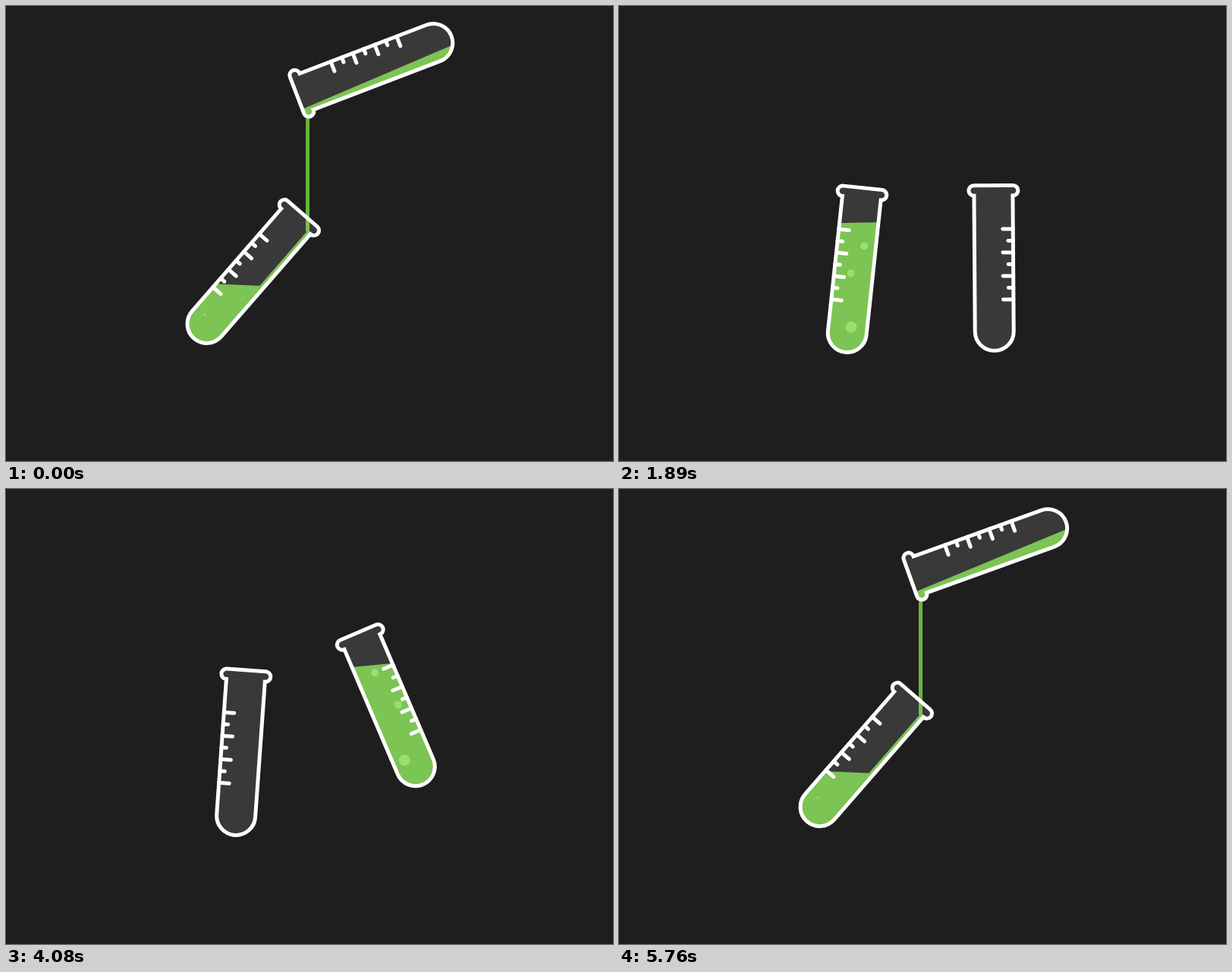
An HTML page with a canvas that plays this animation: 800x600 px, repeating every 5790 ms.

```html
<!DOCTYPE html>
<html lang="en">
<head>
<meta charset="utf-8">
<title>Test tubes</title>
<style>
  html, body { margin: 0; width: 100%; height: 100%; overflow: hidden; background: #1e1e1e; }
  canvas { display: block; }
</style>
</head>
<body>
<canvas id="stage" width="800" height="600"></canvas>
<script>
const ctx = document.getElementById('stage').getContext('2d');
const LOOP = 5790, RAD = Math.PI / 180;
const BACK = '#1e1e1e', GREEN = '#7cc454', BUBBLE = '#98de70', STREAM = '#69b53a';
const CENTER = 400.75, REACH = 92.75, MID = 337;   // tube rest positions
const LIP = { x: -28, y: -93 };                    // pouring edge in tube space
const SWAP_START = 2123, SWAP_TIME = 1707, RETURN = LOOP + 600;

const mix = (a, b, k) => a + (b - a) * k;
const ramp = (t, a, b) => Math.min(1, Math.max(0, (t - a) / (b - a)));
const smooth = (t, a, b) => { const u = ramp(t, a, b); return u * u * (3 - 2 * u); };

function dot(x, y, r, color) {
  if (r <= 0) return;
  ctx.fillStyle = color;
  ctx.beginPath();
  ctx.arc(x, y, r, 0, 7);
  ctx.fill();
}

function line(x1, y1, x2, y2) {
  ctx.beginPath();
  ctx.moveTo(x1, y1);
  ctx.lineTo(x2, y2);
  ctx.stroke();
}

function outline() {
  ctx.beginPath();
  ctx.arc(25.75, -92.75, 6.75, -90 * RAD, 90 * RAD);
  ctx.lineTo(25.5, -86);
  ctx.arc(0, 93, 25.5, 0, Math.PI);
  ctx.lineTo(-25.5, -86);
  ctx.arc(-25.75, -92.75, 6.75, 90 * RAD, 270 * RAD);
  ctx.closePath();
}

// Offset from rest and angle of the receiving tube on the left
function leftPose(t) {
  const tilt = smooth(t, 3916, 4762) - smooth(t, LOOP + 1437, LOOP + 2037);
  return { dx: 17.5 * tilt, dy: 12 * tilt, angle: 41 * tilt };
}

// The right tube lifts, turns about its lip while pouring, then swings back like a damped spring.
function rightPose(t) {
  const pour = ramp(t, 4660, 5950);
  const angle = -68 * smooth(t, 3650, 4750) - 49 * pour;
  const c = Math.cos(angle * RAD), s = Math.sin(angle * RAD);
  const lipX = -62 * smooth(t, 3650, 4650) - 4.5 * pour;
  const lipY = -62 * smooth(t, 3650, 4400) - 40.5 * ramp(t, 4590, 5400);
  const dx = lipX + LIP.x - (LIP.x * c - LIP.y * s);
  const dy = lipY + LIP.y - (LIP.x * s + LIP.y * c);
  const z = .00607 * Math.max(0, t - RETURN), left = (1 + z) * Math.exp(-z);
  return { dx: dx * left + 184 * left * (1 - left), dy: dy * left, angle: angle * left };
}

// A point on the liquid surface and its angle, in tube space
function surface(age) {
  const fill = ramp(age, -420, 330), level = smooth(age, 1450, 2060);
  if (age < 3650) return { x: 0, y: mix(130, -57, fill) + 4.5 * level, angle: -38.5 * (1 - level) };
  const toLip = smooth(age, 4200, 4590), drain = ramp(age, 4590, 6240);
  return {
    x: -25 * toLip + 28 * drain * (1 - drain),
    y: mix(-52.5, -97, toLip),
    angle: 46 * smooth(age, 3700, 4600) + 46 * Math.sin(drain * Math.PI / 2)
  };
}

function bubbles(age) {
  const sway = smooth(age, 1450, 1950) - smooth(age, 2300, 3500);
  const rise = 6 * smooth(age, 1450, 3450);
  const shrink = 1 - ramp(age, 4600, 5200);
  const bubble = (x, y, r, born, swayX, swayY) =>
    dot(x + swayX * sway, y + swayY * sway - rise, r * ramp(age, born, born + 700) * shrink, BUBBLE);
  bubble(-10, 85.5, 7.5, -150, 15, 0);
  bubble(11, 14.7, 5, 0, -15, 0);
  bubble(-.5, -36, 5, 300, 11, 14);
  // one escapes through the mouth
  const u = ramp(age, 860, 1230);
  dot(0, -50 - 45 * u, 6 * Math.sqrt(Math.sin(u * Math.PI)), GREEN);
}

function liquid(age) {
  if (age < -840 || age > 6240) return;
  const { x, y, angle } = surface(age);
  ctx.fillStyle = GREEN;
  ctx.save();
  ctx.translate(x, y);
  ctx.rotate(angle * RAD);
  ctx.fillRect(-300, 0, 600, 600);
  ctx.restore();
  // thin flow down the wall while filling
  if (age < 560) {
    const head = mix(-88, 120, ramp(age, -840, -410)), tail = mix(-88, -50, ramp(age, 410, 560));
    ctx.fillRect(19.8, tail, 8, head - tail);
  }
  bubbles(age);
}

// Scale marks slide around the glass as the tube changes side (-1 to 1).
function marks(side) {
  const k = 1 - Math.abs(side), dir = side < 0 ? 1 : -1;
  for (let i = 0; i < 7; i++) {
    const half = i % 2 ? 10 : 12, rest = i % 2 ? -19 : -12, y = -42 + 15.5 * i;
    line(dir * mix(-25.5, -half, k), y, dir * mix(rest, half, k), y);
  }
}

function tube(turn, side, age) {
  const { dx, dy, angle } = side < 0 ? leftPose(turn) : rightPose(turn);
  ctx.save();
  ctx.translate(CENTER + REACH * side + dx, MID + dy);
  ctx.rotate(angle * RAD);
  outline();
  ctx.fillStyle = 'rgba(255,255,255,.12)';
  ctx.fill();
  ctx.save();
  ctx.clip();
  liquid(age);
  ctx.restore();
  ctx.strokeStyle = '#fff';
  ctx.lineWidth = 5;
  marks(side);
  outline();
  ctx.stroke();
  ctx.restore();
}

function stream(turn) {
  if (turn < 4575 || turn > 6340) return;
  const head = mix(187, 296, ramp(turn, 4590, 4950) ** 2);
  const lip = mix(183, 150, ramp(turn, 4590, 5400));
  const tail = Math.min(head, mix(lip, 296, ramp(turn, 6200, 6340)));
  ctx.strokeStyle = STREAM;
  ctx.lineWidth = 5;
  line(397.5, tail, 397.5, head);
}

// Speed lines behind the tubes: three for the full one, two for the empty one
function trails(u, side) {
  const length = 64 * (1 - Math.abs(2 * u - 1)) ** (u < .5 ? 1.7 : 2.9);
  if (length < 2) return;
  ctx.strokeStyle = '#fff';
  ctx.lineWidth = 4;
  for (let i = 0; i < 5; i++) {
    const dir = i % 2 ? -1 : 1, y = 287.3 + (i >> 1) * 52.6 + (i % 2 ? 28.8 : 0);
    const x = CENTER + dir * (REACH * side - 36.5);
    line(x, y, x - dir * length, y);
  }
}

function frame(now) {
  const t = now % LOOP;
  const turn = t < SWAP_START ? t + LOOP : t;   // counted from swap to swap
  const u = ramp(t, SWAP_START, SWAP_START + SWAP_TIME);
  const side = u < .5 ? 8 * u ** 3 - 1 : 1 - 8 * (1 - u) ** 3;
  ctx.fillStyle = BACK;
  ctx.fillRect(0, 0, 800, 600);
  ctx.lineCap = 'round';
  stream(turn);
  trails(u, side);
  tube(turn, side, t);
  tube(turn, -side, u < .5 ? t + LOOP : t - LOOP);
}

const start = performance.now();
function tick() {
  frame(performance.now() - start);
  requestAnimationFrame(tick);
}
tick();
</script>
</body>
</html>
```
